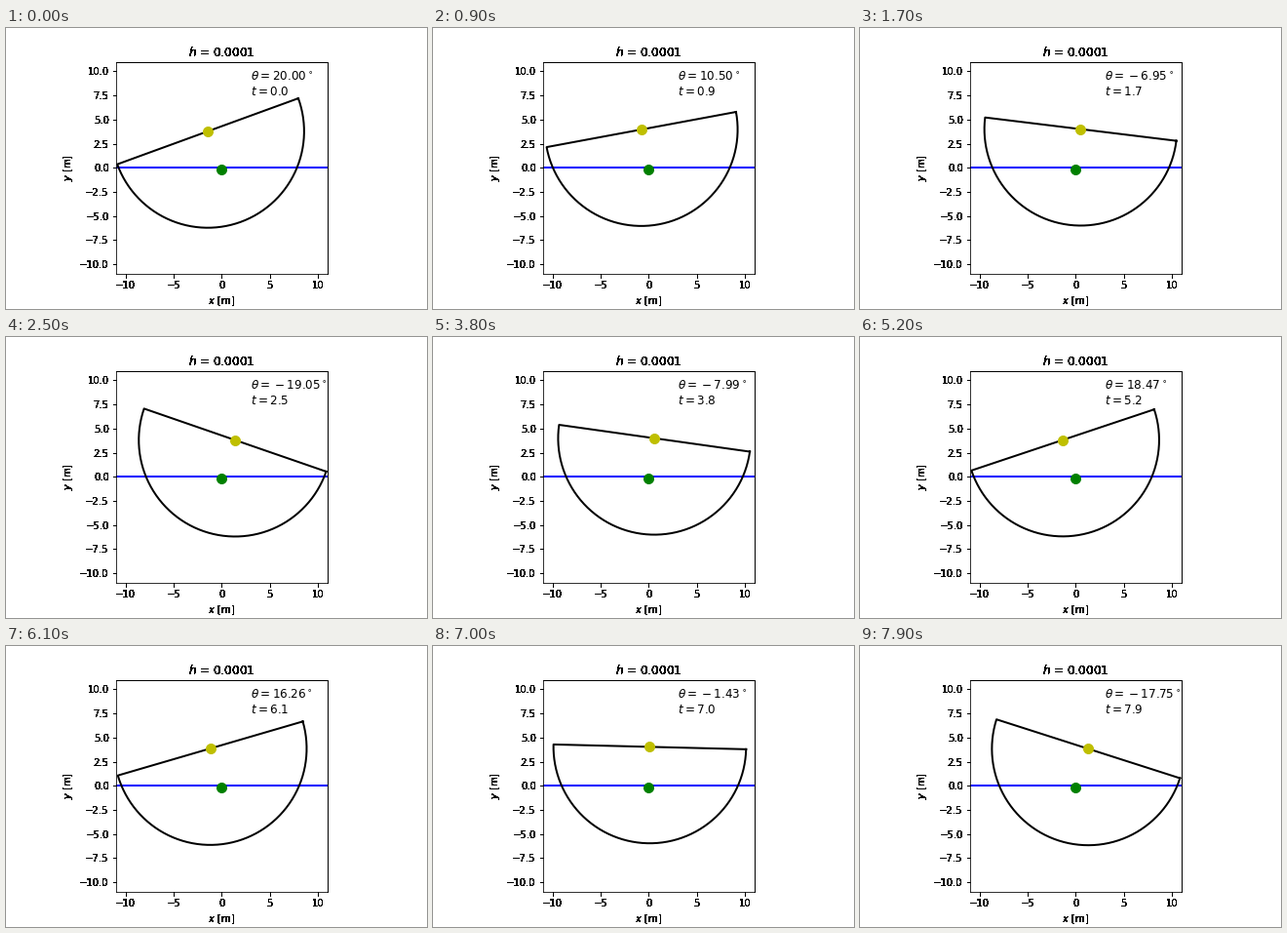
Animation, 432 px wide and 288 px high, one loop 8 s. Source, as a matplotlib script:

```python
import math

import numpy as np
import matplotlib.pyplot as plt
from matplotlib.animation import FuncAnimation

R, G, H = 10.0, 9.81, 1e-4
FRAMES, DT = 80, 0.1
D = 4 * R / (3 * math.pi)                      # centre to centroid
K = G * D / (R**2 * (0.5 - 16 / (9 * math.pi**2)))
Y_MASS = 4.0397 - D                            # floats half submerged


def simulate():
    """Tilt angle at every frame, by explicit Euler steps."""
    theta, omega = math.radians(20), 0.0
    angles = []
    for _ in range(FRAMES):
        angles.append(theta)
        for _ in range(round(DT / H)):
            theta, omega = theta + H * omega, omega - H * K * math.sin(theta)
    return angles


def harden(img, dpi):
    """Turn soft glyph edges solid."""
    out = img.copy()
    out[..., :3] = 0
    out[..., 3] = img[..., 3] > 0.125
    return out, 0, 0


plt.rcParams.update({"font.family": "DejaVu Sans", "font.size": 10})
fig = plt.figure(figsize=(6, 4), dpi=72, facecolor="white")
fig.subplots_adjust(left=0.125, right=0.9, bottom=0.125, top=0.88)
ax = fig.add_subplot()
ax.set_aspect("equal")
ax.set(xlim=(-11, 11), ylim=(-11, 11),
       xticks=np.arange(-10, 11, 5), yticks=np.arange(-10, 10.1, 2.5))
ax.set_xlabel("$x$ [m]")
ax.set_ylabel("$y$ [m]")
title = ax.set_title("$h$ = 0.0001", fontsize=12)
for part in (ax.xaxis, ax.yaxis, title, ax.spines["top"], ax.spines["right"]):
    part.set_agg_filter(harden)

ax.plot([-11, 11], [0, 0], "b", lw=2)
hull, = ax.plot([], [], "k", lw=2)
centre, = ax.plot([], [], "yo", ms=10)
ax.plot([0], [Y_MASS], "go", ms=10)
angle_text = ax.text(3, 9, "", fontsize=12)
time_text = ax.text(3, 7.5, "", fontsize=12)

angles = simulate()
sweep = np.linspace(0, math.pi, 181)


def update(i):
    theta = angles[i]
    cx, cy = -D * math.sin(theta), Y_MASS + D * math.cos(theta)
    x = cx + R * np.cos(theta - sweep)
    y = cy + R * np.sin(theta - sweep)
    hull.set_data(np.append(x, x[0]), np.append(y, y[0]))
    centre.set_data([cx], [cy])
    # the zero space keeps the minus sign spaced like an operator
    angle_text.set_text(rf"$\theta=\hspace{{0}}{math.degrees(theta):.2f}^\circ$")
    time_text.set_text(f"$t={i * DT:.1f}$")
    return hull, centre, angle_text, time_text


anim = FuncAnimation(fig, update, frames=FRAMES, interval=100,
                     repeat=True, repeat_delay=0, blit=False)
plt.show()
```
